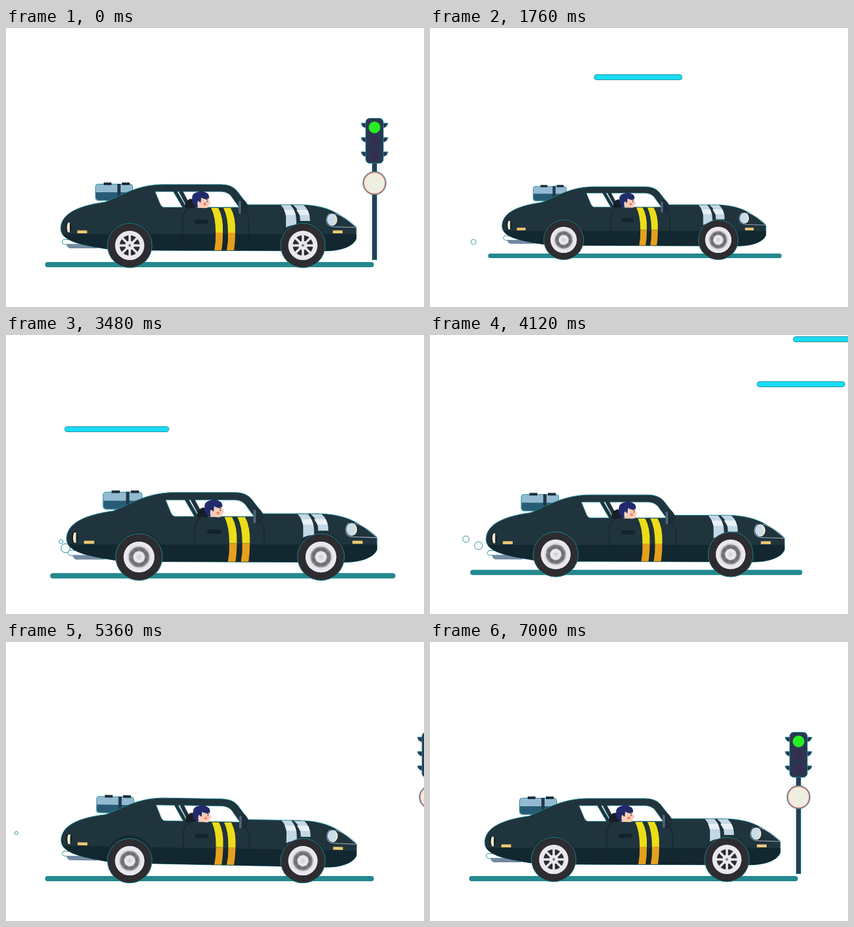
Animation of 642x428 px, one loop 7920 ms. Source, as an HTML page:

```html
<!DOCTYPE html>
<html lang="en">
<head>
<meta charset="utf-8">
<title>Car drive</title>
<style>
html, body { margin: 0; width: 100%; height: 100%; overflow: hidden; background: #fff; }
svg { display: block; width: 100%; height: 100%; }
.edge { stroke: #1b8b97; stroke-width: .9; }
</style>
</head>
<body>
<svg viewBox="0 0 642 428">
  <defs>
    <path id="shell" d="M84 308 C84 286 108 273 152 267 C180 256 200 241 240 240 L330 240 Q346 240 354 249 L371 271 L452 271 C494 272 512 284 538 306 L538 323 C534 335 514 342 490 342 L215 341 L155 339 C122 334 84 328 84 308Z"/>
    <path id="rearGlass" d="M229 251 H257 L271 275 H242 Q238 274 236 268Z"/>
    <path id="frontGlass" d="M263 251 H330 Q339 251 345 257 L358 275 H277Z"/>
    <clipPath id="shellClip"><use href="#shell"/></clipPath>
    <clipPath id="glassClip"><use href="#rearGlass"/><use href="#frontGlass"/></clipPath>
    <mask id="holes">
      <rect width="642" height="428" fill="#fff"/>
      <use href="#rearGlass" fill="#000"/><use href="#frontGlass" fill="#000"/>
    </mask>
    <radialGradient id="spin" gradientUnits="userSpaceOnUse" cx="0" cy="0" r="22.5">
      <stop offset="0" stop-color="#d2d0d5"/><stop offset=".3" stop-color="#efedf1"/>
      <stop offset=".36" stop-color="#d8d6da"/><stop offset=".42" stop-color="#6d6d71"/>
      <stop offset=".6" stop-color="#77777b"/><stop offset=".7" stop-color="#d4d2d7"/>
      <stop offset=".78" stop-color="#eae7ee"/>
    </radialGradient>
    <g id="spokes">
      <circle r="15.5" fill="#2b2b30"/>
      <path id="bars" d="M-16 0H16M0-16V16M-11.3-11.3L11.3 11.3M-11.3 11.3L11.3-11.3" stroke="#eae7ee" stroke-width="3.6"/>
      <circle r="7" fill="#eae7ee"/>
      <circle r="2" fill="#77777c"/>
    </g>
    <g id="wing"><path class="edge" fill="#2d3650" d="M13 -6 H20.5 Q19 1 13 1Z M-13 -6 H-20.5 Q-19 1 -13 1Z"/></g>
    <g id="strap">
      <path fill="#ecdd18" d="M315 276 H326 Q334 290 333 314 H322 Q322 290 315 276Z"/>
      <path fill="#e5a01d" d="M322 314 H333 Q333 330 331 341 H320 Q322.500 328 322 314Z"/>
    </g>
  </defs>

  <g id="lines"></g>

  <g id="signal">
    <rect class="edge" x="-3.5" y="206" width="7" height="149.500" fill="#2e3a52"/>
    <use href="#wing" y="152"/><use href="#wing" y="174"/><use href="#wing" y="196"/>
    <rect class="edge" x="-13.500" y="138.500" width="27" height="69" rx="6" fill="#2d3650"/>
    <circle id="lamp" cy="152.500" r="9"/>
    <circle cy="173.500" r="8" fill="#342f52"/>
    <circle cy="194.500" r="8" fill="#342f52"/>
    <circle class="edge" cy="238" r="17.800" fill="#d8706d"/>
    <circle cy="238" r="15.800" fill="#eeeee1"/>
  </g>

  <g id="zoom">
    <rect x="60" y="359" width="505" height="8" rx="4" fill="#24888f"/>
    <g id="smoke" class="edge"></g>
    <g id="body">
      <path class="edge" fill="#fff" d="M88 324.500 H120 V332 H90 Q86 331 86 328Z"/>
      <path fill="#7489a2" d="M93 331.500 H140 V338 H98 Q93 336 93 331.500Z"/>

      <rect class="edge" x="137.500" y="239.500" width="57" height="25" rx="4" fill="#94bad2"/>
      <path fill="#285c76" d="M138 252 H194 V264 H142 Q138 263 138 259Z"/>
      <rect x="171" y="239" width="5" height="25" fill="#22384a"/>
      <path d="M150 239 H162 M178 239 H190" stroke="#1d2f3b" stroke-width="4"/>

      <g mask="url(#holes)">
        <use href="#shell" class="edge" fill="#20343d"/>
        <g clip-path="url(#shellClip)">
          <rect x="80" y="316" width="462" height="30" fill="#12272f"/>
          <circle cx="190" cy="335" r="37" fill="#152930"/>
          <circle cx="456" cy="335" r="37" fill="#152930"/>
        </g>
      </g>
      <g clip-path="url(#glassClip)">
        <g id="glint" fill="#86d2df">
          <path d="M-22 250 H10 L24 276 H-8Z M20 250 H34 L48 276 H34Z"/>
        </g>
      </g>
      <path d="M229 251 H257 L271 275 H242 Q238 274 236 268Z M263 251 H330 Q339 251 345 257 L358 275 H277Z" fill="none" stroke="#1b8b97" stroke-width=".7"/>
      <path d="M268 250 L282 276" stroke="#20343d" stroke-width="6"/>
      <path fill="#171d26" d="M275 276 Q274 265 283 262 Q291 262 291 276Z"/>

      <path fill="#f8cdb7" d="M294 276 V262 L302 257 H311 L312 264 L314.500 269 L312 270.500 L311 275 Q308 277 303 276Z"/>
      <path fill="#202a6d" d="M291 275 Q284 268 286 260 Q286 253 295 251.500 Q301 248 308 253 Q312 254 312 261 Q304 264 300 260 L299 268 L295 265 Q293 270 295 275Z"/>
      <circle cx="305.500" cy="270" r="2.300" fill="#ef8275"/>
      <path d="M306 262 L310 263.500 M309 265 V267" stroke="#2b2942" stroke-width="1.200"/>

      <path fill="none" stroke="#13262e" stroke-width="1.200" d="M271.500 338 V295 Q272 280 282 276 M373 338 V298 Q372 284 361 278"/>
      <rect x="289.500" y="294" width="21" height="6.500" rx="3" fill="#14242c"/>
      <use href="#strap"/><use href="#strap" x="19"/>

      <path fill="#c3d7e5" d="M422 271.500 H437 Q446 281 446 297 L446 302 Q437 302 430 306 V290 Q430 280 422 271.500Z M441 271.500 H457 Q467 280 467 296 H452 Q452 280 441 271.500Z"/>
      <path fill="#e8eff5" d="M427 279 H442 L445 287 H430Z M446 279 H463 L466 287 H451Z"/>

      <path fill="#1b2d38" d="M358 266 Q360 261 366 264 Q372 270 371 278 Q370 287 360 286Z"/>
      <rect x="357" y="265" width="4" height="20" rx="2" fill="#4c6277"/>

      <ellipse cx="501" cy="294" rx="9.500" ry="10.500" fill="#16262e"/>
      <ellipse cx="501" cy="294" rx="8" ry="9.500" fill="#c9dcec"/>
      <path fill="#f1e3b4" d="M504 285.500 Q512 294 504 302.500 Q507 294 504 285.500Z"/>
      <path d="M497 284 Q490 291 493 300 Q496 305 505 305 L538 306 M505 284.500 Q523 290 538 305" fill="none" stroke="#9fb2bd" stroke-width="1"/>
      <rect x="502" y="310.500" width="15" height="4.500" fill="#edc873"/>
      <rect x="109.500" y="310.500" width="15" height="4.500" fill="#edc873"/>
      <ellipse cx="96" cy="306" rx="4.500" ry="9" fill="#101f26"/>
      <path fill="#f0e6cb" d="M95 298.500 H98 V313.500 H95 Q92 306 95 298.500Z"/>
    </g>
    <g id="wheels"></g>
  </g>
</svg>
<script>
const LOOP = 7920, STEP = 40;
const $ = id => document.getElementById(id);
const set = (el, name, value) => el.setAttribute(name, value);
const clamp = v => Math.max(0, Math.min(1, v));

function make(parent, tag, attrs) {
  const el = document.createElementNS('http://www.w3.org/2000/svg', tag);
  for (const k in attrs) set(el, k, attrs[k]);
  return parent.appendChild(el);
}

// Smooth interpolation through [time, value] keys
function track(t, keys) {
  let [pt, pv] = keys[0];
  for (const [kt, kv] of keys) {
    if (t < kt) {
      const u = clamp((t - pt) / (kt - pt));
      return pv + (kv - pv) * u * u * (3 - 2 * u);
    }
    [pt, pv] = [kt, kv];
  }
  return pv;
}

const streaks = [
  { y: 71, w: 135, v: .89, starts: [1322, 3963] },
  { y: 140, w: 160, v: .94, starts: [2090, 2893, 4492] },
  { y: 2, w: 130, v: 1.4, starts: [900, 2480, 4060] }
].flatMap(s => s.starts.map(at => ({
  ...s, at,
  el: make($('lines'), 'rect', { y: s.y + .5, width: s.w, height: 8, rx: 4, fill: '#19dcf5', class: 'edge' })
})));

// Start, drift x, drift y, radius
const puffs = [
  [300, -96, -109, 9], [900, -90, -40, 5], [1500, -143, 38, 4.7], [2000, -110, -30, 5],
  [2400, -90, -40, 5], [2700, -90, -20, 5], [3400, -47, -20, 6.6], [3380, -84, -84, 3],
  [3900, -110, -40, 5], [4000, -90, -15, 6], [4800, -90, -40, 5], [5530, -40, -18, 6]
].map(([at, dx, dy, r], i) => ({
  at, dx, dy, r, el: make($('smoke'), 'circle', { fill: i ? '#fff' : '#8e9c86' })
}));

const wheels = [190, 456].map(x => {
  const g = make($('wheels'), 'g', {});
  make(g, 'circle', { r: 34.2, fill: '#2d2c30', class: 'edge' });
  make(g, 'circle', { r: 22.5, fill: '#eae7ee' });
  const spokes = make(g, 'use', { href: '#spokes' });
  const blur = make(g, 'circle', { r: 22.5, fill: 'url(#spin)' });
  return { x, g, spokes, blur };
});

const UP = 1200, BRAKE = 5100, STOP = 6360;

function drawWheels(t) {
  const left = Math.max(0, STOP - t), span = STOP - BRAKE;
  const speed = Math.min(1, t / UP, left / span);
  const angle = t < UP ? t * t / UP / 2
    : t < BRAKE ? t - UP / 2
    : BRAKE - UP / 2 + span / 2 - left * left / span / 2;
  const drop = track(t, [[0, 0], [500, 2], [5900, 2], [STOP, 0]]);
  for (const w of wheels) {
    set(w.g, 'transform', `translate(${w.x} ${333.6 + drop})`);
    set(w.spokes, 'transform', `rotate(${angle % 360})`);
    set(w.blur, 'opacity', .95 * Math.min(1, speed * 1.6));
  }
}

function drawCar(t) {
  const scale = track(t, [[1000, 1], [1800, .892], [2800, 1.078], [4500, 1]]);
  const shift = track(t, [[1500, 0], [3000, 27], [4500, 0]]);
  set($('zoom'), 'transform',
    `translate(${312.5 + shift} 237) scale(${scale}) translate(-312.5 -237)`);

  const tilt = track(t, [[200, 0], [700, 1.9], [900, 1.9], [1300, 0],
    [5100, 0], [5600, 1.9], [5900, 1.9], [STOP, 0]]);
  const sway = track(t, [[900, 0], [1400, 1], [4800, 1], [5300, 0]]);
  const bob = sway * 3.2 * (1 + Math.cos(t * Math.PI / 400));
  set($('body'), 'transform', `translate(0 ${bob}) rotate(${tilt} 290 340)`);

  const pass = (t + 1015) % 1855;
  set($('glint'), 'transform', `translate(${t < 5200 ? 255 - .3 * (pass > 1300 ? pass - 1855 : pass) : -99} 0)`);
}

function drawSignal(t) {
  const x = t < 3000
    ? 566 - 151 * (t / 840) ** 3
    : 566 + 26 * Math.max(0, (6087 - t) / 487) ** 3;
  set($('signal'), 'transform', `translate(${x} 0)`);
  set($('lamp'), 'fill', t > 3000 && t < 7000 ? '#bf4444' : '#27ee23');
}

function draw(t) {
  for (const s of streaks) {
    const x = 642 - s.v * (t - s.at);
    set(s.el, 'x', x);
    set(s.el, 'visibility', x < 642 && x > -s.w ? 'visible' : 'hidden');
  }
  for (const p of puffs) {
    const u = clamp((t - p.at) / 700);
    set(p.el, 'cx', 88 + p.dx * u);
    set(p.el, 'cy', 325 + p.dy * u);
    set(p.el, 'r', p.r * Math.min(1, u * 10) * (1 - u ** 3));
    set(p.el, 'visibility', u > 0 && u < 1 ? 'visible' : 'hidden');
  }
  drawSignal(t);
  drawCar(t);
  drawWheels(t);
}

const begin = performance.now();
function tick() {
  const t = (performance.now() - begin) % LOOP;
  draw(Math.floor(t / STEP) * STEP);
  requestAnimationFrame(tick);
}
tick();
</script>
</body>
</html>
```
